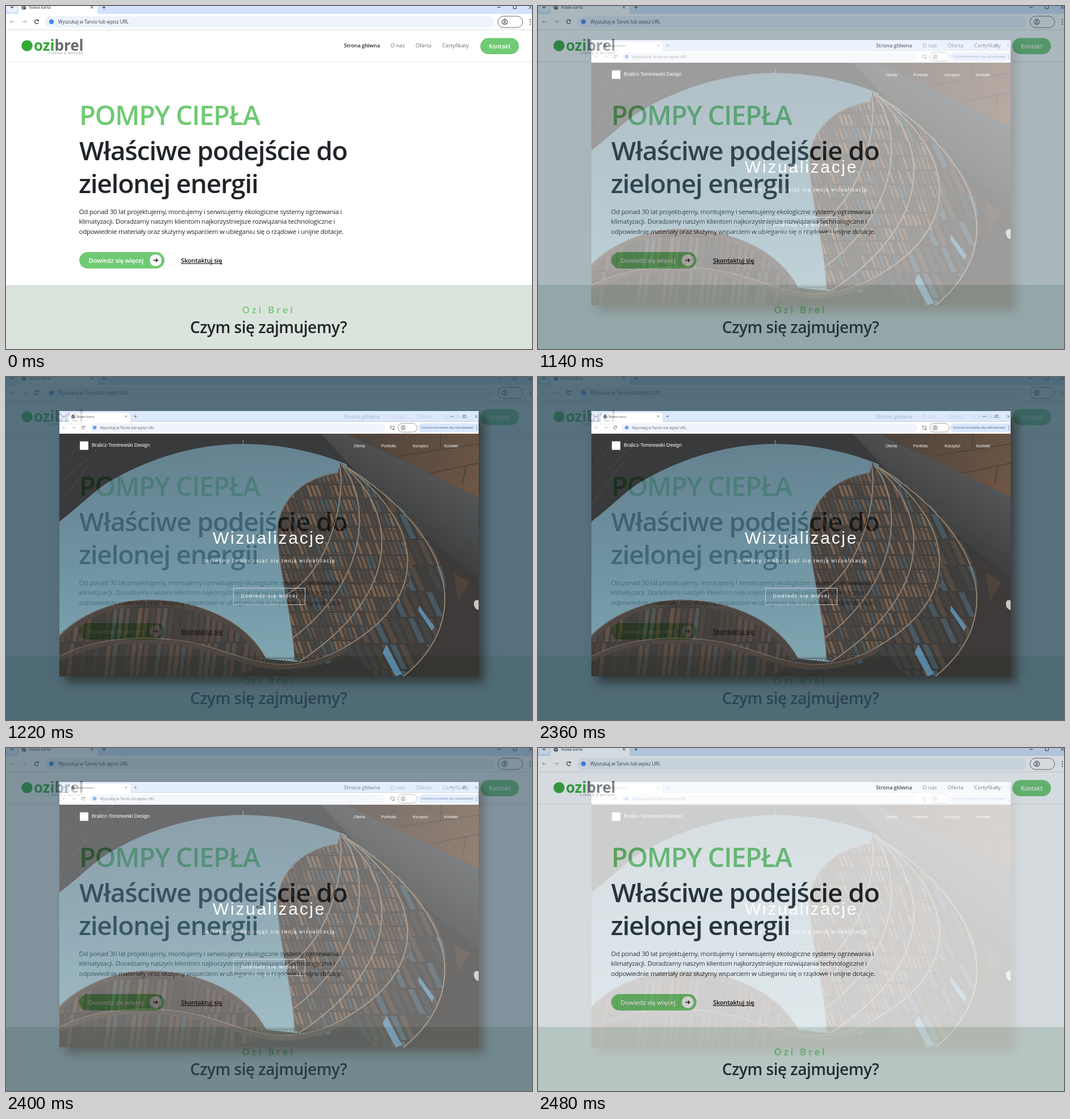
An HTML page with a canvas for the animation above (2.52 s loop, 926 by 605 pixels).

```html
<!DOCTYPE html>
<html lang="pl">
<head>
<meta charset="utf-8">
<title>Realizacje</title>
<style>
  html, body { margin: 0; width: 100%; height: 100%; overflow: hidden; background: #fff; }
  canvas { display: block; width: 926px; height: 605px; }
</style>
</head>
<body>
<canvas id="stage" width="926" height="605"></canvas>
<script>
const W = 926, H = 605;
const SANS = '"Open Sans", "Noto Sans", sans-serif';
const ARIAL = '"Liberation Sans", sans-serif';
const GREEN = '#70ca73', INK = '#212529', BAR = '#d3e3fd';

function layer(draw) {
  const c = document.createElement('canvas');
  c.width = W;
  c.height = H;
  draw(c.getContext('2d'));
  return c;
}

function text(g, str, x, y, size, color, { weight = 400, gap = 0, family = SANS } = {}) {
  g.font = `${weight} ${size}px ${family}`;
  g.letterSpacing = gap + 'px';
  g.fillStyle = color;
  g.fillText(str, x, y);
}

function rect(g, x, y, w, h, color) {
  g.fillStyle = color;
  g.fillRect(x, y, w, h);
}

function pill(g, x, y, w, h, r, fill, stroke) {
  g.beginPath();
  g.roundRect(x, y, w, h, r);
  if (fill) { g.fillStyle = fill; g.fill(); }
  if (stroke) { g.strokeStyle = stroke; g.lineWidth = 1; g.stroke(); }
}

function disc(g, x, y, r, fill, stroke, width = 1) {
  g.beginPath();
  g.arc(x, y, r, 0, Math.PI * 2);
  if (fill) { g.fillStyle = fill; g.fill(); }
  if (stroke) { g.strokeStyle = stroke; g.lineWidth = width; g.stroke(); }
}

function path(g, d, fill, stroke, width = 1) {
  const p = new Path2D(d);
  if (fill) { g.fillStyle = fill; g.fill(p); }
  if (stroke) { g.strokeStyle = stroke; g.lineWidth = width; g.stroke(p); }
  return p;
}

function fade(g, x0, y0, x1, y1, ...colors) {
  const f = g.createLinearGradient(x0, y0, x1, y1);
  colors.forEach((c, i) => f.addColorStop(i / (colors.length - 1), c));
  return f;
}

// Seeded random numbers keep the facade stable.
function seeded(s) {
  return () => (s = (s * 16807) % 2147483647) / 2147483647;
}

// Browser frame; y = 0 lies just above the tab title.
function browser(g, w, fieldEnd, pillX, right) {
  const dark = '#30343a', pale = '#a4a7ab';
  rect(g, 0, -10, w, 24, BAR);
  rect(g, 0, 14, w, 28, '#fff');
  pill(g, 1, -6, 19, 17, 5, '#e9f1ff');
  path(g, 'M8 1 l2.5 2.5 l2.5 -2.5', null, dark, 1.2);
  pill(g, 22, -6, 139, 21, [7, 7, 0, 0], '#fff');
  disc(g, 31.5, 2.5, 4, '#4a4e54');
  path(g, 'M28.5 1 l3 1.5 l-1 3 M32 -1 l3 2 l-2 2', null, '#fff', 1);
  text(g, 'Nowa karta', 40.5, 5, 7.2, dark);
  path(g, 'M149 0 l4.5 4.5 m0 -4.5 l-4.5 4.5', null, dark, 1);
  path(g, 'M169.5 2.3 h6 m-3 -3 v6', null, dark, 1);
  path(g, `M${right - 58} 2.3 h6 M${right - 30} -.7 h5.5 v5.5 h-5.5 z
    M${right - 3} -.5 l6 6 m0 -6 l-6 6`, null, dark, 1);

  path(g, 'M15 27.7 h-7.5 m3 -3 l-3 3 l3 3 M29 27.7 h7 m-3 -3 l3 3 l-3 3', null, pale, 1);
  g.beginPath();
  g.arc(54, 27.7, 3.4, .5, 5.6);
  g.strokeStyle = dark;
  g.lineWidth = 1.2;
  g.stroke();
  path(g, 'M57.8 23.6 v3.5 h-3.5 z', dark);
  pill(g, 69, 18, fieldEnd - 69, 20, 10, '#edf2fb');
  disc(g, 80, 27.8, 4.2, '#4285f4');
  text(g, 'Wyszukaj w Tarvio lub wpisz URL', 92, 30.8, 8.2, '#3c4046');
  pill(g, pillX, 18, 43.5, 20, 10, null, '#66696e');
  disc(g, pillX + 12, 28, 4.8, null, dark);
  disc(g, pillX + 12, 26.6, 1.6, null, dark);
  path(g, `M${pillX + 8.8} 31 q3.2 -2.6 6.4 0`, null, dark);
}

function dots(g, x) {
  for (const y of [24, 28, 32]) disc(g, x, y, 1, '#30343a');
}

function heatPage(g) {
  rect(g, 0, 0, W, H, '#fff');
  browser(g, W, 860, 866, 923);
  dots(g, 923);
  rect(g, 0, 41.5, W, 1, '#d9dbde');
  rect(g, 0, 98, W, 1, '#e3e4e5');

  disc(g, 37, 70, 9.8, '#35a936');
  text(g, 'ozi', 49, 79, 26, '#35a936', { weight: 700 });
  const mid = 49 + g.measureText('ozi').width;
  text(g, 'brel', mid, 79, 26, '#67696b', { weight: 700 });
  text(g, 'CIEPŁO Z NATURY', 75, 85, 5.3, '#67696b', { gap: 1.2 });

  text(g, 'Strona główna', 595, 73, 9.2, INK, { weight: 600 });
  [['O nas', 677], ['Oferta', 721], ['Certyfikaty', 768]].forEach(([s, x]) =>
    text(g, s, x, 73, 9.4, '#6c6e70'));
  pill(g, 835, 56.5, 68, 28.5, 14.2, GREEN);
  text(g, 'Kontakt', 850, 74.5, 10, '#fff', { weight: 600 });

  text(g, 'POMPY CIEPŁA', 129, 210, 47, GREEN, { weight: 600, gap: -1.4 });
  text(g, 'Właściwe podejście do', 129, 272, 46, INK, { weight: 600, gap: -1.15 });
  text(g, 'zielonej energii', 128, 330, 46, INK, { weight: 600, gap: -1.25 });
  [
    'Od ponad 30 lat projektujemy, montujemy i serwisujemy ekologiczne systemy ogrzewania i',
    'klimatyzacji. Doradzamy naszym klientom najkorzystniejsze rozwiązania technologiczne i',
    'odpowiednie materiały oraz służymy wsparciem w ubieganiu się o rządowe i unijne dotacje.'
  ].forEach((s, i) => text(g, s, 128.5, 366.7 + i * 17.4, 11.5, INK, { gap: -.26 }));

  pill(g, 129, 434, 150, 29, 14.5, GREEN);
  text(g, 'Dowiedz się więcej', 145.5, 453, 11, '#fff', { weight: 600, gap: -.13 });
  disc(g, 263.5, 448.5, 10.5, '#fff');
  path(g, 'M259.5 448.5 h7.5 m-3 -3 l3 3 l-3 3', null, '#111', 1.3);
  text(g, 'Skontaktuj się', 308, 453, 11, '#111', { weight: 600, gap: -.17 });
  rect(g, 308, 454, 73, 1, '#111');

  rect(g, 0, 492, W, 113, '#dbe4dc');
  text(g, 'Ozi Brel', 415.5, 542, 17, GREEN, { weight: 600, gap: 3.7 });
  text(g, 'Czym się zajmujemy?', 324, 577, 28, INK, { weight: 600, gap: -.52 });
}

// Slanted panels laid in rows, clipped to a building outline.
function facade(g, shape, box, step, slant, colors, seed) {
  const [x0, y0, x1, y1] = box, [w, h] = step, rnd = seeded(seed);
  g.save();
  g.clip(shape);
  for (let y = y0; y < y1; y += h) {
    for (let x = x0; x < x1; x += w) {
      g.fillStyle = colors[Math.floor(rnd() * colors.length)];
      g.beginPath();
      g.moveTo(x, y);
      g.lineTo(x + w * .62, y);
      g.lineTo(x + w * .62 + slant, y + h - 3);
      g.lineTo(x + slant, y + h - 3);
      g.fill();
    }
  }
  g.restore();
}

function photo(g) {
  g.save();
  g.beginPath();
  g.rect(94, 100, 738, 428);
  g.clip();
  rect(g, 94, 100, 738, 428, '#08090b');

  path(g, 'M94 255 C130 228 160 195 190 180 C260 140 340 118 420 118 C500 119 560 138 600 154 V528 H94 Z',
    fade(g, 300, 118, 330, 500, '#3f6274', '#4b788b', '#608f9e'));
  path(g, 'M94 190 L190 100 M94 225 L150 150 M94 160 L140 110', null, '#15181b', 1.5);
  path(g, 'M417.5 111 v8', null, '#79858b', 1);

  // Ceiling and slab
  path(g, 'M598 100 H832 V212 Z', fade(g, 640, 100, 832, 180, '#23160c', '#4a2c16'));
  path(g, 'M690 140 L832 118 M745 170 L832 152 M765 100 V128 M810 157 L803 190', null, '#1b110a', 1.5);
  path(g, 'M554 100 H598 L832 212 V358 L660 214 Z', fade(g, 650, 240, 720, 135, '#0c0d0e', '#1c1e20', '#2a2c2e'));
  path(g, 'M765 310 L832 358 V528 H715 Z', '#0d0a08');
  path(g, 'M788 345 L816 362 L796 395 Z', '#21150b');
  g.beginPath();
  g.ellipse(830, 402, 6, 9, -.3, 0, Math.PI * 2);
  g.fillStyle = '#b9b7b1';
  g.fill();

  // Round tower
  const outer = path(g, 'M588 152 C690 205 775 300 775 380 C775 440 738 495 700 528 H505 L515 495 Z', '#0e0d0b');
  facade(g, outer, [500, 150, 780, 528], [16, 46], 20, ['#131716', '#1a140e', '#291c12', '#100e0c', '#1b2f3b'], 47);
  const tower = path(g, 'M588 152 L585 169 C510 180 478 230 478 275 C480 345 507 430 508 500 C580 495 640 455 690 400 C730 350 716 290 670 230 Q630 178 588 152 Z', '#15110d');
  facade(g, tower, [440, 166, 730, 505], [8, 25], 8, ['#372417', '#4a311d', '#261c14', '#181817', '#573a24', '#1d2d34'], 91);
  g.save();
  g.clip(tower);
  for (let k = 0; k < 14; k++) {
    const y = 192 + k * 25;
    path(g, `M474 ${y + 8} Q570 ${y - 24} 725 ${y + 14}`, null, '#1d1711', 2);
  }
  g.restore();
  [[492, 385], [505, 460], [515, 503], [560, 495], [700, 528]].forEach(([x, y], k) =>
    path(g, `M${586 + 4 * k} ${152 + 2 * k} C${600 + 44 * k} ${200 + 18 * k}
      ${575 + 64 * k} ${340 + 20 * k} ${x} ${y}`, null, '#75634f', 2));
  path(g, 'M585 169 C510 180 478 230 478 275 C480 345 507 430 508 500', null, '#4a3a2b', 1.5);
  path(g, 'M727 403 l27 37 l-4 8 l-24 -36 z M670 472 l27 52 l-11 4 l-23 -42 z', '#376d91');

  // Low curved building
  const low = path(g, 'M94 458 C130 418 190 394 250 393 C350 394 425 435 458 497 L560 508 V528 H94 Z', '#15100c');
  facade(g, low, [80, 408, 450, 528], [11, 62], -7, ['#33221a', '#412b1a', '#201812', '#151311', '#2a2e2d'], 23);
  g.save();
  g.clip(low);
  rect(g, 94, 390, 470, 138, fade(g, 0, 440, 0, 528, 'rgba(8,7,6,0)', 'rgba(8,7,6,.65)'));
  g.restore();
  path(g, 'M94 462 C130 422 190 399 250 398 C350 400 420 438 452 499', null, '#231b16', 9);
  path(g, 'M94 458 C130 418 190 394 250 393 C350 394 425 435 458 497', null, '#50423a', 1.2);
  path(g, 'M94 498 C150 467 230 460 300 469 C370 477 410 506 480 512 Q540 514 600 480', null, '#231a13', 8);
  path(g, 'M94 493 C150 462 230 455 300 464 C370 472 410 501 480 507 Q540 509 600 475', null, '#655241', 1.2);
  path(g, 'M440 514 Q520 528 610 490 L650 528 H400 Z', '#0b0a09');
  path(g, 'M448 496 H520', null, '#30343a', 1);
  for (let x = 450; x < 520; x += 5) rect(g, x, 496, .8, 10, '#30343a');
  g.restore();
}

function studioPage(g) {
  rect(g, 0, 0, W, H, '#2d4d5d');
  g.save();
  g.shadowColor = 'rgba(0,0,0,.8)';
  g.shadowOffsetX = 10;
  g.shadowOffsetY = 11;
  g.shadowBlur = 16;
  rect(g, 94, 61, 738, 467, '#111');
  g.restore();
  photo(g);

  g.save();
  g.beginPath();
  g.rect(94, 60, 738, 40);
  g.clip();
  g.translate(94, 67.7);
  g.scale(.776, .776);
  browser(g, 952, 739, 768, 946);
  pill(g, 814, 18, 142, 20, 10, BAR);
  text(g, 'Uruchom ponownie, aby zaktualizować', 820.5, 30.5, 6.55, '#0c2d62');
  dots(g, 947);
  path(g, 'M750 24.5 h7 m-7 3 h5 m-5 3 h3 m6 1 v-7 h2', null, '#30343a', 1);
  disc(g, 757.5, 31.5, 1.6, '#30343a');
  g.restore();

  const white = '#fff', face = { family: ARIAL };
  rect(g, 130, 113.5, 15, 15, white);
  text(g, 'Bralicz-Tomirewski Design', 151, 123.3, 8.75, white, face);
  [['Oferta', 612], ['Portfolio', 660.5], ['Korzyści', 716], ['Kontakt', 771.5]].forEach(([s, x]) =>
    text(g, s, x, 124, 7.2, white, face));
  text(g, 'Wizualizacje', 364, 294, 30, white, { family: ARIAL, gap: 2.7 });
  text(g, 'Jesteśmy tu aby zająć się twoją wizualizacją', 346.5, 327, 8.7, white, { family: ARIAL, gap: 1.43 });
  g.strokeStyle = '#b9c3c8';
  g.lineWidth = 1;
  g.strokeRect(400.5, 372.5, 126, 29);
  text(g, 'Dowiedz się więcej', 413.5, 389, 8.7, white, { family: ARIAL, gap: 1.5 });
}

// Opacity of the second page, in hard 40 ms steps.
function mix(t) {
  if (t < 1100) return 0;
  if (t < 1260) return (Math.floor((t - 1100) / 40) + 1) / 5;
  if (t < 2360) return 1;
  return (4 - Math.floor((t - 2360) / 40)) / 5;
}

const LOOP = 2520;
const stage = document.getElementById('stage').getContext('2d');
const first = layer(heatPage), second = layer(studioPage);
const start = performance.now();

function frame() {
  const t = (performance.now() - start) % LOOP;
  stage.globalAlpha = 1;
  stage.drawImage(first, 0, 0);
  stage.globalAlpha = mix(t);
  stage.drawImage(second, 0, 0);
  requestAnimationFrame(frame);
}
frame();
</script>
</body>
</html>
```
